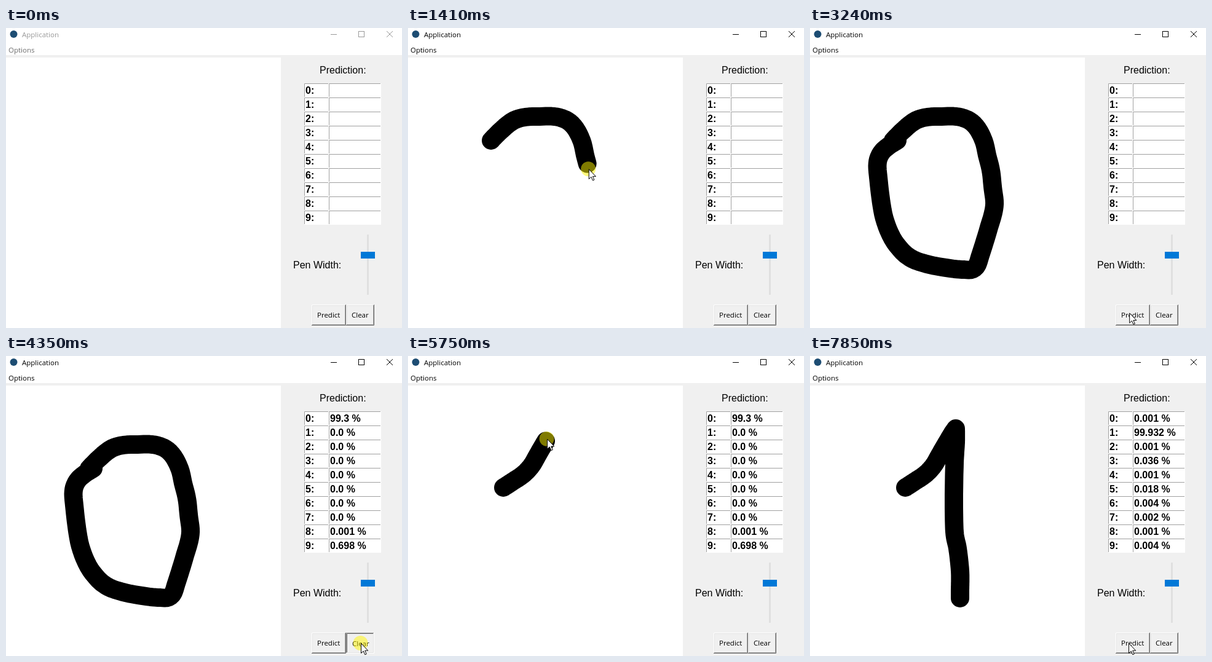
These frames come from a looping animation (644x488 px, 8000 ms). An HTML page:

```html
<!DOCTYPE html>
<html lang="en">
<head>
<meta charset="utf-8">
<title>Application</title>
<style>
  html, body { margin: 0; width: 100%; height: 100%; overflow: hidden; background: #fff; }
  svg { display: block; width: 644px; height: 488px; }
  text { fill: #000; white-space: pre; }
  .ui { font: 11.5px "Open Sans", "Noto Sans", sans-serif; }
  .label { font: 16px "Liberation Sans", Arial, sans-serif; }
  .cell { font: bold 16px "Liberation Sans", Arial, sans-serif; }
  .line { fill: none; stroke: #000; }
  .inactive .title { fill: #999; }
  .inactive .menu { fill: #6d6d6d; }
  .inactive .line { stroke: #999; }
  .edge { fill: none; stroke-width: 1; }
  .hi { stroke: #fff; }
  .hi2 { stroke: #e3e3e3; }
  .lo { stroke: #696969; }
  .lo2 { stroke: #a0a0a0; }
  .down .hi { stroke: #a0a0a0; }
  .down .hi2 { stroke: #696969; }
  .down .lo { stroke: #fff; }
  .down .lo2 { stroke: #e3e3e3; }
  .down text { transform: translate(1px, 1px); }
  .ink { fill: none; stroke: #000; stroke-width: 30; stroke-linecap: round; stroke-linejoin: round; }
</style>
</head>
<body>
<svg id="app" viewBox="0 0 644 488">
  <rect width="644" height="488" fill="#fff"/>
  <path d="M0 44H644V488H447V48H0Z" fill="#f0f0f0"/>
  <circle cx="12.5" cy="10" r="6" fill="#1d4d73"/>
  <text class="ui title" x="26" y="15">Application</text>
  <text class="ui menu" x="4" y="40">Options</text>
  <g class="line">
    <path d="M528 10.5H538M573.5 5.5H582.5V14.5H573.5Z" shape-rendering="crispEdges"/>
    <path d="M619 5L629 15M629 5L619 15"/>
  </g>
  <text class="label" x="510" y="74">Prediction:</text>
  <g id="table"></g>
  <text class="label" x="467" y="391">Pen Width:</text>
  <rect x="587" y="336" width="3" height="98" fill="#e0e0e0"/>
  <rect x="577" y="364" width="23" height="11" fill="#0078d7"/>
  <g id="buttons"></g>
  <polyline id="zero" class="ink"/>
  <polyline id="one" class="ink"/>
  <g id="cursor">
    <circle id="glow" cx="-.5" r="12" fill="#fff600" fill-opacity=".5"/>
    <path d="M.5 .5V16.5L4.2 13L6.8 18.8L9.2 17.8L6.7 12.2H11.7Z" fill="#fff" stroke="#000"/>
  </g>
</svg>
<script>
const LOOP = 8000, LAG = 18;
const $ = id => document.getElementById(id);

// Mouse tracks: rows of time, x, y. The pointer rests after each track.
const enter = [[310, 452, 488], [400, 385, 424], [480, 292, 347], [580, 192, 268], [680, 144, 202], [760, 135, 183]];
const zero = [
  [800, 135, 183], [930, 152, 166], [1000, 171, 151], [1050, 190, 145], [1095, 212, 144],
  [1160, 238, 144], [1215, 258, 150], [1265, 272, 163], [1320, 283, 185], [1365, 288, 207],
  [1415, 294, 231], [1480, 297, 258], [1550, 300, 288], [1690, 290, 328], [1800, 276, 373],
  [1840, 271, 387], [1872, 263, 393], [1920, 250, 393], [1952, 235, 392], [2035, 190, 384],
  [2100, 160, 372], [2150, 139, 350], [2200, 126, 325], [2250, 118, 297], [2350, 111, 243],
  [2430, 110, 218], [2480, 116, 203], [2540, 129, 191], [2590, 142, 183]
];
const toPredict = [[2610, 142, 183], [2670, 152, 208], [2730, 169, 240], [2900, 260, 322], [3080, 420, 420], [3260, 521, 464]];
const toClear = [[3770, 521, 464], [3950, 552, 467], [4130, 577, 467]];
const back = [[4430, 577, 467], [4640, 360, 335], [4850, 155, 214]];
const one = [
  [5140, 155, 214], [5320, 172, 203], [5440, 188, 192], [5540, 201, 178], [5640, 212, 159],
  [5750, 226, 135], [5820, 232, 125], [5890, 237, 118], [6080, 237, 118], [6170, 237, 140],
  [6270, 235, 175], [6380, 234, 235], [6470, 235, 286], [6580, 240, 313], [6720, 244, 350],
  [6870, 244, 383], [6930, 244, 394]
];
const again = [[6960, 244, 394], [7180, 330, 420], [7420, 460, 456], [7640, 518, 467]];
const tracks = [enter, zero, toPredict, toClear, back, one, again];

// Button state spans
const presses = { Predict: [[3360, 3450], [7680, 7800]], Clear: [[4300, 4430]] };
const drags = [[800, 2610], [5140, 6960]];
const results = [
  [3490, [99.3, "0.0", "0.0", "0.0", "0.0", "0.0", "0.0", "0.0", 0.001, 0.698]],
  [7850, [0.001, 99.932, 0.001, 0.036, 0.001, 0.018, 0.004, 0.002, 0.001, 0.004]]
];

const within = (t, spans) => spans.some(([a, b]) => t >= a && t < b);

function slope(keys, i, axis) {
  const a = keys[i - 1], b = keys[i + 1], k = keys[i];
  if (!a || !b) return 0;
  const still = p => p[1] === k[1] && p[2] === k[2];
  return still(a) || still(b) ? 0 : (b[axis] - a[axis]) / (b[0] - a[0]);
}

// Hermite curve through timed keys
function sample(keys, t) {
  const last = keys.length - 1;
  if (t >= keys[last][0]) return keys[last].slice(1);
  if (t <= keys[0][0]) return keys[0].slice(1);
  const i = keys.findIndex(k => k[0] > t) - 1;
  const a = keys[i], b = keys[i + 1], d = b[0] - a[0], u = (t - a[0]) / d;
  const h = u * u * (3 - 2 * u);
  return [1, 2].map(n =>
    a[n] + (b[n] - a[n]) * h +
    d * (u * (1 - u) * (1 - u) * slope(keys, i, n) - u * u * (1 - u) * slope(keys, i + 1, n)));
}

function trace(keys, t) {
  const pts = [], start = keys[0][0], end = Math.min(t, keys[keys.length - 1][0]);
  for (let s = start; s < end; s += 12) pts.push(sample(keys, s));
  pts.push(sample(keys, end));
  return pts.map(p => p.map(v => v.toFixed(1)).join()).join(" ");
}

function box(x, y, w) {
  return `<path d="M${x} ${y}h${w}v23h${-w}Z" fill="#fff"/>
    <path class="edge lo2" d="M${x + .5} ${y + 22}V${y + .5}H${x + w - 1}"/>`;
}

function button(name, x, w, tx) {
  const r = x + w, corner = (n, c, c2) =>
    `<path class="edge ${c}" d="M${x + n} ${484 - n}V${450 + n}H${r - n}"/>
     <path class="edge ${c2}" d="M${x + n - .5} ${484 - n}H${r - n}V${450 + n - .5}"/>`;
  return `<g id="${name}"><rect x="${x}" y="450" width="${w}" height="34" fill="#f0f0f0"/>
    ${corner(.5, "hi", "lo")}${corner(1.5, "hi2", "lo2")}
    <text class="ui" x="${tx}" y="471">${name}</text></g>`;
}

$("table").innerHTML = [...Array(10).keys()].map(i => {
  const y = 90 + 23 * i;
  return box(485, y, 40) + box(525, y, 85) +
    `<text class="cell" x="487" y="${y + 17}">${i}:</text>
     <text class="cell value" x="527" y="${y + 17}"></text>`;
}).join("");
$("buttons").innerHTML = button("Predict", 497, 56, 506) + button("Clear", 553, 46, 562);
const values = document.querySelectorAll(".value");

function ink(id, keys, t, until) {
  const shown = t >= keys[0][0] && t < until;
  $(id).setAttribute("points", shown ? trace(keys, Math.max(keys[0][0], t - LAG)) : "");
}

function draw(t) {
  $("app").classList.toggle("inactive", t < 800);
  ink("zero", zero, t, 4430);
  ink("one", one, t, LOOP);

  const track = tracks.filter(k => t >= k[0][0]).pop();
  $("cursor").style.display = track ? "" : "none";
  if (track) $("cursor").setAttribute("transform", `translate(${sample(track, t).map(v => v.toFixed(1))})`);

  let held = within(t, drags);
  for (const name in presses) {
    const down = within(t, presses[name]);
    $(name).classList.toggle("down", down);
    held = held || down;
  }
  $("glow").style.display = held ? "" : "none";

  const shown = results.filter(r => t >= r[0]).pop();
  values.forEach((v, i) => {
    const s = shown ? shown[1][i] + " %" : "";
    if (v.textContent !== s) v.textContent = s;
  });
}

const begin = performance.now();
function tick() {
  draw((performance.now() - begin) % LOOP);
  requestAnimationFrame(tick);
}
tick();
</script>
</body>
</html>
```
